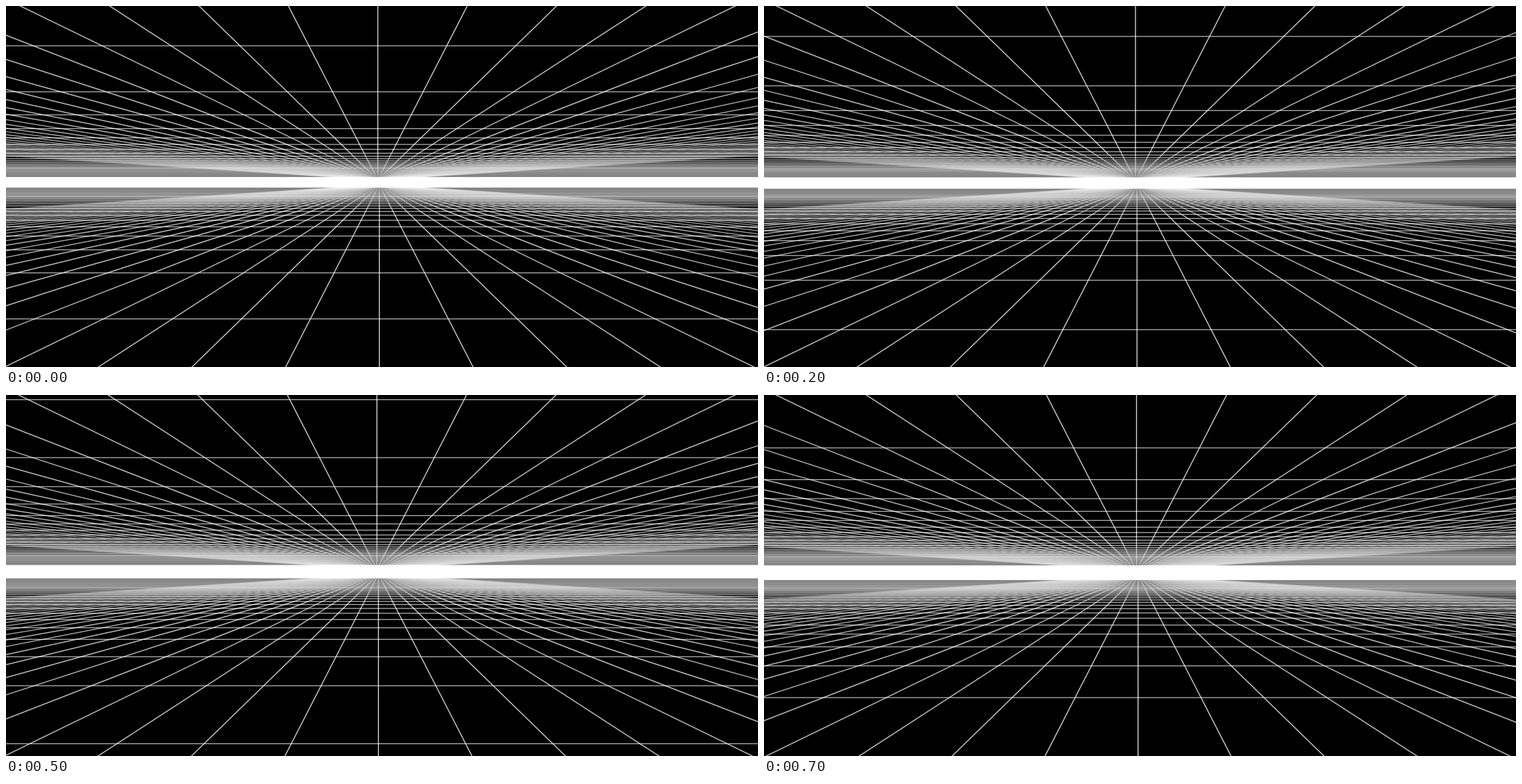
Recreate the animation shown at these times as an HTML page with a canvas. Size 1079 by 519 pixels, loop 0.8 s.

```html
<!DOCTYPE html>
<html lang="en">
<head>
<meta charset="utf-8">
<title>Perspective grid</title>
<style>
  html, body { margin: 0; width: 1079px; height: 519px; overflow: hidden; background: #000; }
  canvas { display: block; }
</style>
</head>
<body>
<canvas id="stage" width="1079" height="519"></canvas>
<script>
const W = 1079, H = 519;
const STEP_MS = 100;
const ROWS = 40;          // depth at which the planes end
const SIDE_LINES = 30;    // receding lines on each side of the centre
const SPREAD = 0.513;     // gap between receding lines per pixel of height
const FAN_OFFSET = 3.5;   // vanishing points lie this far from the middle

// Each pose: travelled steps, then the slightly shaking centre.
const poses = [
  [0, 533, 253], [1, 533, 253.5], [2, 532.5, 254], [3, 533, 254.5],
  [5, 533.5, 255], [6, 531.7, 253.5], [7, 534.5, 254.6], [8, 534, 255]
];

const ctx = document.getElementById('stage').getContext('2d');

function drawRows(horizon, scale, dir) {
  for (let k = 1; k <= ROWS; k++) {
    const gap = scale / (k * k);
    ctx.fillStyle = `rgba(255,255,255,${Math.min(0.7, 0.55 * gap)})`;
    ctx.fillRect(0, horizon + dir * scale / k - 0.1, W, 1.25);
  }
}

function drawFan(cx, y, dir) {
  const reach = dir < 0 ? y + 2 : H - y + 2;
  const fade = ctx.createLinearGradient(0, y, 0, y + dir * 45);
  fade.addColorStop(0, 'rgba(255,255,255,0.4)');
  fade.addColorStop(1, '#fff');
  ctx.strokeStyle = fade;
  ctx.lineWidth = 1.35;
  for (let m = -SIDE_LINES; m <= SIDE_LINES; m++) {
    ctx.globalAlpha = 0.85 - 0.014 * Math.abs(m);
    ctx.beginPath();
    ctx.moveTo(cx, y);
    ctx.lineTo(cx + m * SPREAD * reach, y + dir * reach);
    ctx.stroke();
  }
  ctx.globalAlpha = 1;
}

function draw(time) {
  const [steps, cx, cy] = poses[Math.floor(time / STEP_MS) % poses.length];
  const scale = 397 / (1 - 0.0344 * steps);
  const overlap = scale / 180;
  const halfBand = scale / ROWS - overlap;

  ctx.fillStyle = '#000';
  ctx.fillRect(0, 0, W, H);
  for (const dir of [-1, 1]) {
    drawRows(cy - dir * overlap, scale, dir);
    drawFan(cx + 1.6 + dir * 1.1, cy + 0.5 + dir * FAN_OFFSET, dir);
  }
  ctx.fillStyle = '#fff';
  ctx.fillRect(0, cy + 0.5 - halfBand, W, 2 * halfBand);
}

const start = performance.now();
function tick() {
  draw(performance.now() - start);
  requestAnimationFrame(tick);
}
tick();
</script>
</body>
</html>
```
